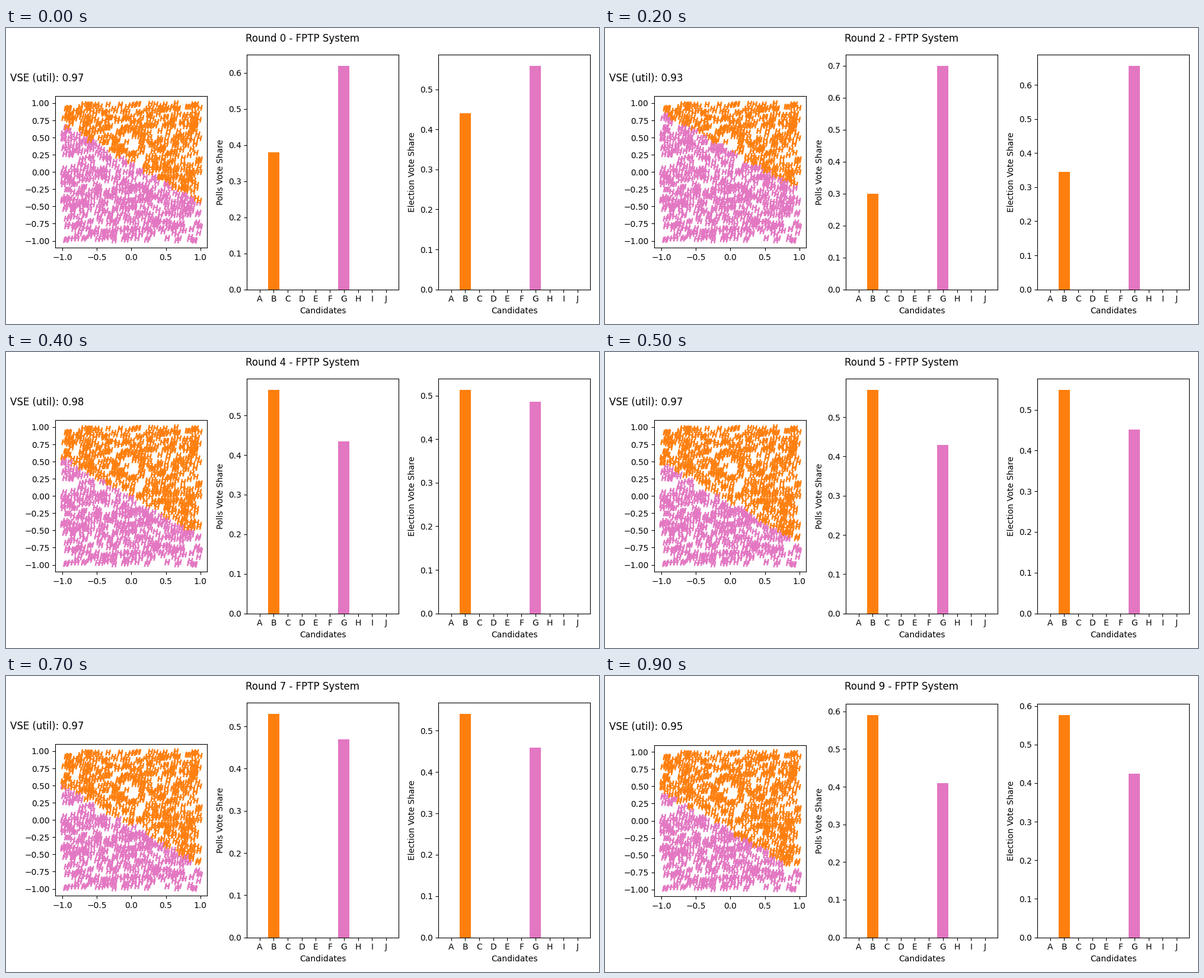
A matplotlib script that plays this animation: 1000x500 px, repeating every 1 s.

```python
import matplotlib.pyplot as plt
import numpy as np
from matplotlib.animation import FuncAnimation

W, H, DPI = 1000, 500, 100
ROUNDS = 10
ORANGE, PINK = "#ff7f0e", "#e377c2"
NAMES = list("ABCDEFGHIJ")
B, G = NAMES.index("B"), NAMES.index("G")

# Panel geometry in pixels, measured from the top left
LEFT, PITCH, WIDTH = 83.4, 323, 255.9
TOP, BOTTOM = 44.9, 441.6
HALF_LABEL = 5.7

# Candidate B's share in key rounds: (round, poll, election); G gets the rest
KEYS = np.array([(0, .38, .441), (2, .30, .344), (3, .56, .478), (5, .57, .549),
                 (7, .53, .541), (8, .50, .525), (9, .59, .576)])
TILT = 0.57  # downward slope of the border between the camps


def shares(n):
    return [np.interp(n, KEYS[:, 0], KEYS[:, col]) for col in (1, 2)]


def satisfaction(vote):
    """Voter satisfaction drops linearly on both sides of a near tie."""
    return 0.9943 - 0.45 * abs(vote - 0.486)


def make_bars(ax, label):
    colors = [f"C{i}" for i in range(len(NAMES))]
    bars = ax.bar(NAMES, [0] * len(NAMES), color=colors)
    ax.set_xlabel("Candidates")
    ax.set_ylabel(label)
    return bars


def set_share(ax, bars, share):
    """Update one chart and return how far its top label sticks out."""
    bars[B].set_height(share)
    bars[G].set_height(1 - share)
    peak = 1.05 * max(share, 1 - share)
    ax.set_ylim(0, peak)
    ticks = ax.get_yticks()
    gap = (1 - ticks[ticks <= peak].max() / peak) * (BOTTOM - TOP)
    return max(0, HALF_LABEL - gap)


def place(top):
    for i, ax in enumerate(axes):
        ax.set_position([(LEFT + PITCH * i) / W, 1 - BOTTOM / H,
                         WIDTH / W, (BOTTOM - top) / H])


fig, axes = plt.subplots(1, 3, figsize=(W / DPI, H / DPI), dpi=DPI)
field, poll_ax, vote_ax = axes
title = fig.suptitle("", y=0.982)

x, y = np.random.default_rng(7).uniform(-1, 1, (2, 1000))
leaning = y + TILT * x
crowd = field.scatter(x, y, marker="$H$")
field.set(xlim=(-1.1, 1.1), ylim=(-1.1, 1.1), aspect="equal",
          xticks=np.linspace(-1, 1, 5), yticks=np.linspace(-1, 1, 9))
score = field.text(-0.3, 1.1, "", fontsize=12, transform=field.transAxes)

poll_bars = make_bars(poll_ax, "Polls Vote Share")
vote_bars = make_bars(vote_ax, "Election Vote Share")
place(TOP)


def update(n):
    poll, vote = shares(n)
    title.set_text(f"Round {n} - FPTP System")
    score.set_text(f"VSE (util): {satisfaction(vote):.2f}")
    border = np.quantile(leaning, 1 - vote)
    crowd.set_color(np.where(leaning > border, ORANGE, PINK))
    place(TOP + max(set_share(poll_ax, poll_bars, poll),
                    set_share(vote_ax, vote_bars, vote)))
    return []


anim = FuncAnimation(fig, update, frames=ROUNDS, interval=100, repeat=True)
plt.show()
```
